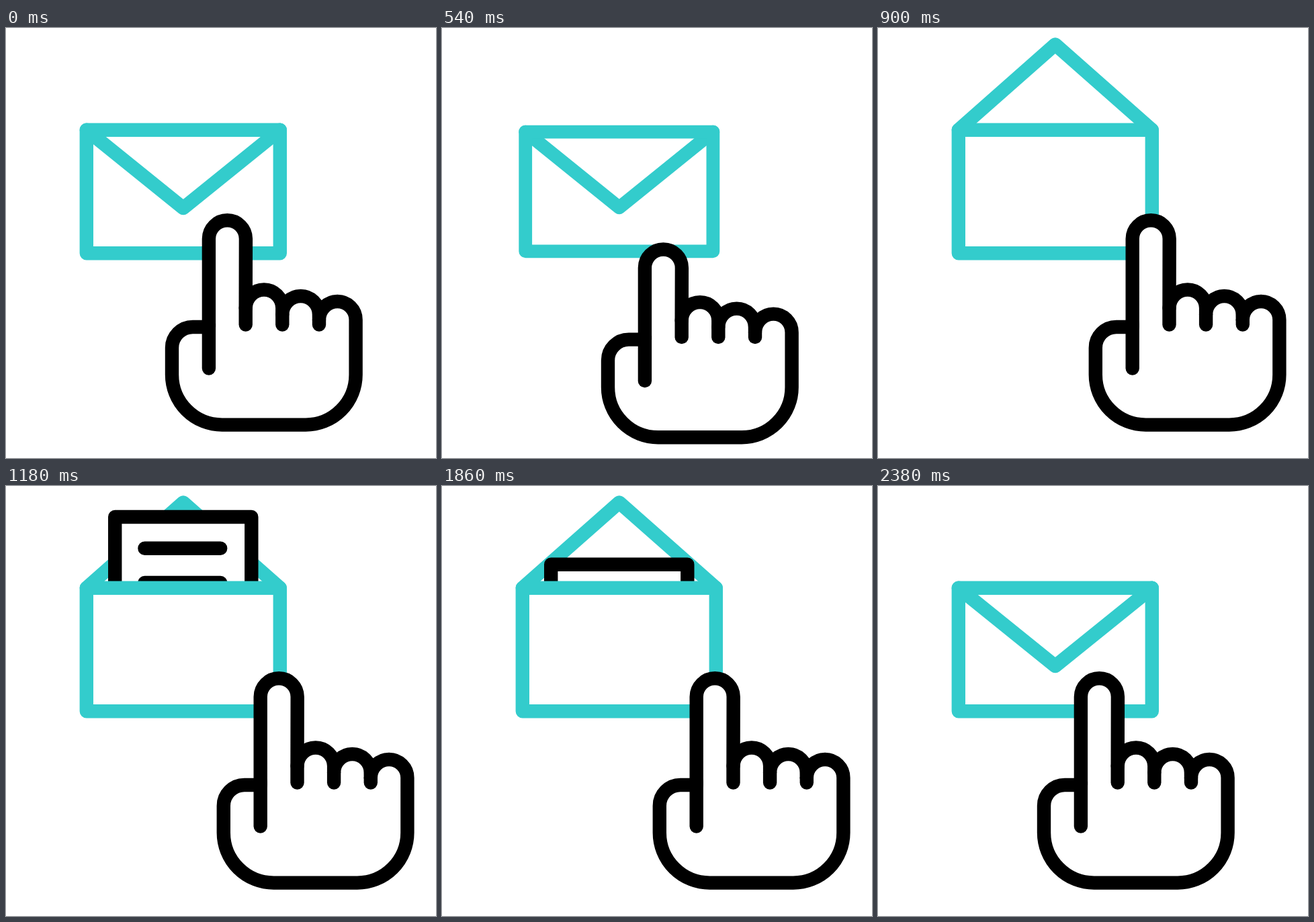
An HTML page with a canvas that plays this animation: 640x640 px, repeating every 2.4 s.

```html
<!DOCTYPE html>
<html lang="en">
<head>
<meta charset="utf-8">
<title>Opening an envelope</title>
<style>
  html, body { margin: 0; width: 100%; height: 100%; overflow: hidden; background: #fff; }
  canvas { display: block; width: 640px; height: 640px; }
</style>
</head>
<body>
<canvas id="stage" width="640" height="640"></canvas>
<script>
const ctx = document.getElementById('stage').getContext('2d');
const LOOP = 2400, STEP = 20, WEIGHT = 20.4;
const TEAL = '#33cccc', BLACK = '#000', WHITE = '#fff';
const ENV = { left: 119.8, right: 407.8, top: 151.7, bottom: 335.2, midX: 263.8, midY: 243.5 };
const FLAP_UP = 24.5, FLAP_DOWN = 268;

// Eased progress from 0 to 1 between two times.
function ease(t, from, to) {
  const p = Math.min(1, Math.max(0, (t - from) / (to - from)));
  return p * p * (3 - 2 * p);
}

function polyline(points, color, fill) {
  ctx.beginPath();
  points.forEach(([x, y]) => ctx.lineTo(x, y));
  if (fill) { ctx.fillStyle = fill; ctx.fill(); }
  ctx.strokeStyle = color;
  ctx.stroke();
}

// The tip is blunted while the flap passes through the flat position.
function drawFlap(apex) {
  const rise = Math.abs(ENV.top - apex);
  const cut = Math.min(Math.max(0, 8.8 * (1 - rise / 100)), rise * 0.53);
  const share = rise ? cut / rise : 0.53;
  const half = (ENV.midX - ENV.left) * share;
  const y = apex + Math.sign(ENV.top - apex) * cut;
  polyline([[ENV.left, ENV.top], [ENV.midX - half, y], [ENV.midX + half, y], [ENV.right, ENV.top]], TEAL);
}

function drawLetter(drop) {
  ctx.save();
  ctx.beginPath();
  ctx.rect(0, 0, 640, 142);
  ctx.clip();
  ctx.translate(0, drop);
  polyline([[162.2, 190], [162.2, 23.8], [365.3, 23.8], [365.3, 190]], BLACK, WHITE);
  for (const y of [70.5, 121.7]) polyline([[206.4, y], [319.2, y]], BLACK);
  ctx.restore();
}

function drawBody() {
  ctx.strokeStyle = TEAL;
  ctx.strokeRect(ENV.left, ENV.top, ENV.right - ENV.left, ENV.bottom - ENV.top);
}

function drawHand(dx, dy, tipDy) {
  const left = 301.9, knuckles = [[384, 416.8], [438.6, 426.3], [493.3, 434.3]], r = 27.3;
  ctx.save();
  ctx.translate(dx, dy);
  ctx.beginPath();
  ctx.moveTo(left, 445);
  ctx.arc(329.4, 313.8 + tipDy - dy, 27.5, Math.PI, 0);
  knuckles.forEach(([x, y]) => ctx.arc(x, y, r, Math.PI, 0));
  ctx.arc(446, 516, 74.6, 0, Math.PI / 2);
  ctx.arc(321.6, 516, 74.6, Math.PI / 2, Math.PI);
  ctx.arc(278, 476, 31, Math.PI, Math.PI * 1.5);
  ctx.closePath();
  ctx.fillStyle = WHITE;
  ctx.fill();
  ctx.strokeStyle = BLACK;
  ctx.stroke();
  polyline([[left, 440], [left, 506.5]], BLACK);
  knuckles.forEach(([x, y]) => polyline([[x - r, y], [x - r, 441.5]], BLACK));
  ctx.restore();
}

function draw(t) {
  const press = ease(t, 100, 600) - ease(t, 600, 900);
  const open = ease(t, 600, 900) - ease(t, 2000, 2380);
  const out = ease(t, 900, 1280) - ease(t, 1600, 2000);

  ctx.fillStyle = WHITE;
  ctx.fillRect(0, 0, 640, 640);
  ctx.lineWidth = WEIGHT;
  ctx.lineCap = ctx.lineJoin = 'round';

  ctx.save();
  const scale = 1 - 0.032 * press;
  ctx.translate(ENV.midX, ENV.midY);
  ctx.scale(scale, scale);
  ctx.translate(-ENV.midX, -ENV.midY);
  drawFlap(FLAP_DOWN + (FLAP_UP - FLAP_DOWN) * open);
  if (out > 0) drawLetter(129.5 * (1 - out));
  drawBody();
  ctx.restore();

  drawHand(76.8 * open, 19.4 * press, 45 * press);
}

let start;
function tick(now) {
  start ??= now;
  draw(Math.floor(((now - start) % LOOP) / STEP + 0.01) * STEP);
  requestAnimationFrame(tick);
}
draw(0);
requestAnimationFrame(tick);
</script>
</body>
</html>
```
